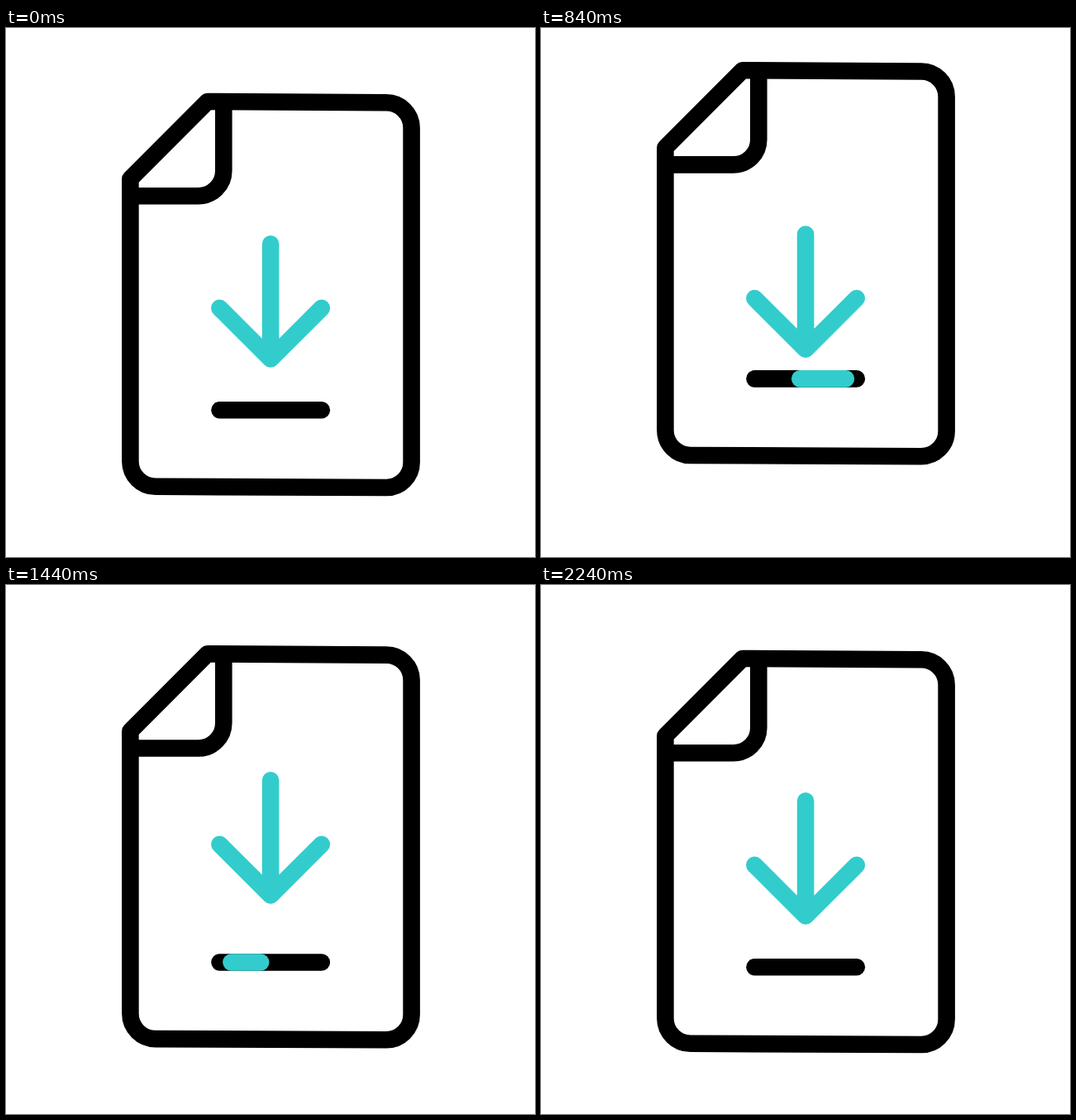
Write an HTML page that moves like this. It is 640 px wide and 640 px high and loops after 2480 ms.

```html
<!DOCTYPE html>
<html lang="en">
<head>
<meta charset="utf-8">
<title>File download</title>
<style>
html, body { margin: 0; width: 100%; height: 100%; overflow: hidden; background: #fff; }
svg { display: block; width: 100%; height: 100%; }
</style>
</head>
<body>
<svg viewBox="0 0 640 640" fill="none" stroke="#000" stroke-width="20.6" stroke-linecap="round" stroke-linejoin="round">
  <g id="page">
    <path d="M150.4 182.5L243.7 89L460 90.3A30.5 30.5 0 0 1 490.6 120.8V525.5A30.5 30.5 0 0 1 460 556L181 554.8A30.5 30.5 0 0 1 150.4 524.3Z"/>
    <path d="M263.3 92V172.7A30.5 30.5 0 0 1 232.8 203.2H152"/>
    <path d="M258.5 462.2H381.8"/>
    <path id="progress" stroke="#3cc"/>
  </g>
  <path id="arrow" stroke="#3cc" d="M320.1 261.4V400.5M258.4 338.9L320.1 400.5L381.8 338.9"/>
</svg>
<script>
const LOOP = 2480, STEP = 40;
const BAR_RIGHT = 381.8, BAR_LENGTH = 123.3, BAR_Y = 462.2;

// Smooth curve through [time, value] points that never overshoots them.
function track(points) {
  const slopes = points.slice(1).map(([t, v], i) => (v - points[i][1]) / (t - points[i][0]));
  const tangents = points.map((_, i) => {
    const a = slopes[i - 1] || 0, b = slopes[i] || 0;
    return a * b > 0 ? 2 * a * b / (a + b) : 0;
  });
  return time => {
    if (time <= points[0][0]) return points[0][1];
    const i = points.findIndex(p => p[0] >= time) - 1;
    if (i < 0) return points[points.length - 1][1];
    const [t0, v0] = points[i], [t1, v1] = points[i + 1];
    const span = t1 - t0, s = (time - t0) / span, r = 1 - s;
    return r * r * (1 + 2 * s) * v0 + s * s * (3 - 2 * s) * v1
      + span * s * r * (r * tangents[i] - s * tangents[i + 1]);
  };
}

const pageLift = track([[280, 0], [400, 1.6], [480, 5.8], [640, 24], [840, 37.8], [960, 38.6],
  [1080, 37.8], [1160, 34.7], [1280, 24], [1400, 8.8], [1440, 5.7], [1520, 1.6], [1640, 0]]);
const arrowLift = track([[280, 0], [480, 5.2], [840, 11.9], [1160, 18.5], [1440, 25.1],
  [1560, 27], [1920, 5], [1960, 3.5], [2120, 0.6], [2260, 0]]);
const barHead = track([[300, 0], [480, 0.153], [840, 0.556], [1160, 0.758], [1440, 0.887], [1720, 1]]);
const barTail = track([[300, 0], [480, 0.024], [840, 0.105], [1160, 0.198], [1440, 0.597], [1720, 1]]);

const [page, progress, arrow] = ["page", "progress", "arrow"].map(id => document.getElementById(id));
const barX = part => BAR_RIGHT - BAR_LENGTH * part;

function draw(time) {
  const head = barHead(time), tail = barTail(time);
  page.setAttribute("transform", `translate(0 ${-pageLift(time)})`);
  arrow.setAttribute("transform", `translate(0 ${-arrowLift(time)})`);
  progress.setAttribute("d", head > tail ? `M${barX(tail)} ${BAR_Y}H${barX(head)}` : "");
}

const start = performance.now();
function frame() {
  const time = (performance.now() - start) % LOOP;
  draw(Math.floor(time / STEP) * STEP);
  requestAnimationFrame(frame);
}
frame();
</script>
</body>
</html>
```
